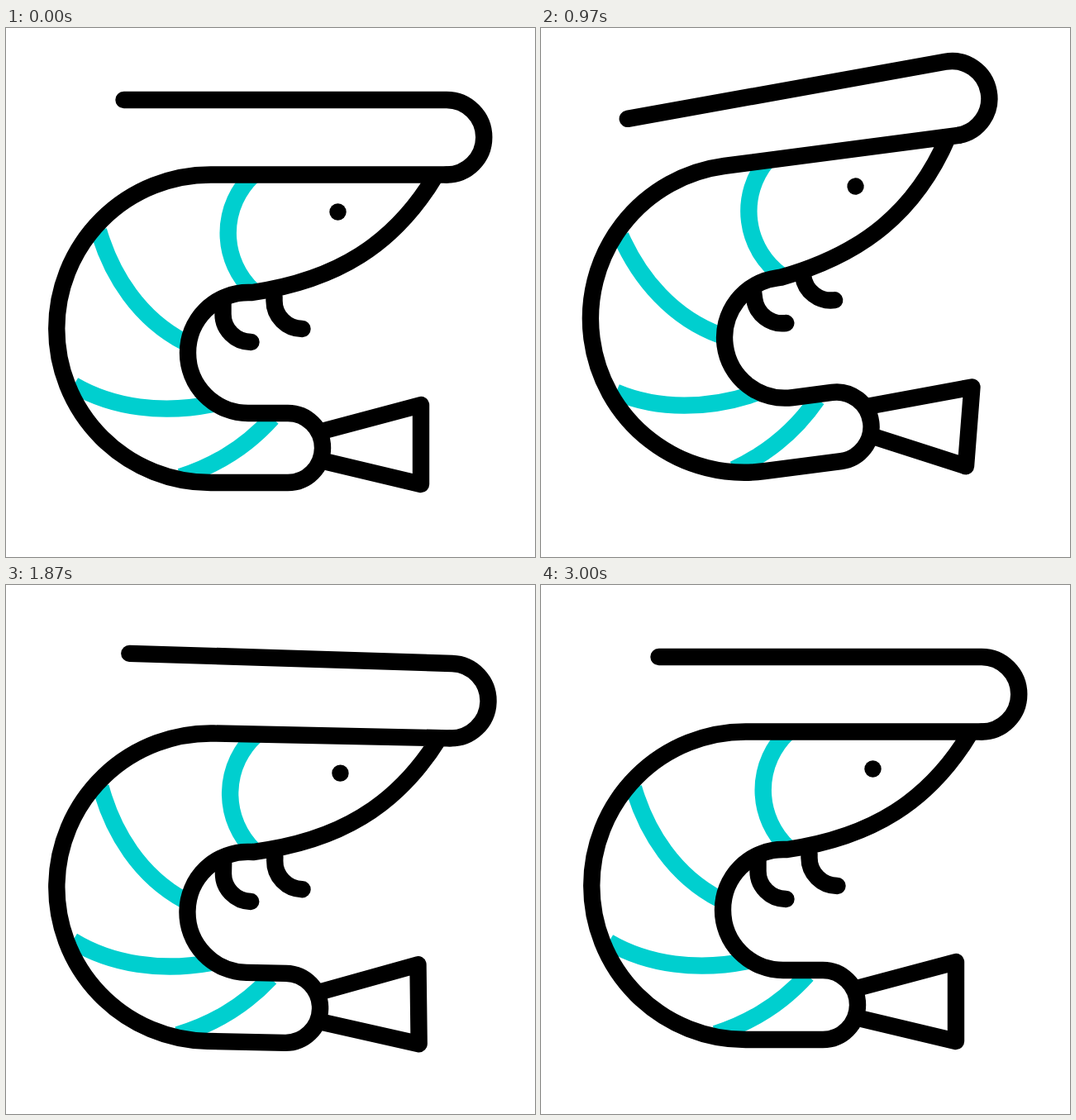
These frames come from a looping animation (640x640 px, 3.27 s). An HTML page:

```html
<!DOCTYPE html>
<html lang="en">
<head>
<meta charset="utf-8">
<title>Shrimp</title>
<style>
  html, body { margin: 0; height: 100%; overflow: hidden; background: #fff; }
  svg { display: block; width: 100%; height: 100%; }
</style>
</head>
<body>
<svg viewBox="0 0 640 640" fill="none" stroke="#000" stroke-width="20.4" stroke-linejoin="round">
  <g id="body">
    <g stroke="#00cfcf">
      <path d="M299 178A96 96 0 0 0 299 318"/>
      <path d="M112 245C128 300 162 352 216 380"/>
      <path d="M82 432C130 460 190 467 250 455"/>
      <path d="M211 543Q277 522 322 472"/>
    </g>
    <path id="tail" d="M378 489L502 456V552L378 522.500"/>
    <g stroke-linecap="round">
      <path id="leg1" d="M262.500 332V346A34 34 0 0 0 296.500 380"/>
      <path id="leg2" d="M324.500 325V330A34 34 0 0 0 358.500 364"/>
      <path id="antenna" d="M142.500 87H533a45 45 0 0 1 0 90.500"/>
      <path d="M533 177.500H247.500A186 186 0 0 0 247.500 550H341a42 42 0 0 0 0-84H293A73 73 0 0 1 293 320H298C400 305 470 262 520 178"/>
    </g>
    <ellipse id="eye" cx="401.500" cy="222.500" rx="10.200" ry="10.200" fill="#000" stroke="none"/>
  </g>
</svg>
<script>
const LOOP = 3270, LAST = 90, STEP = 10, LEG_CYCLE = 56;
const el = id => document.getElementById(id);
const smooth = u => u * u * (3 - 2 * u);

// Eased swings to alternating sides, one per STEP ticks. Each left-right pair
// has its own size; after `count` swings the part settles back to zero.
function swing(tick, count, size, settle = 1) {
  const angle = i => i < 1 || i > count ? 0 : (i % 2 ? 1 : -1) * size(Math.floor((i - 1) / 2));
  const pos = tick / STEP, i = Math.min(Math.floor(pos), count);
  const u = Math.min(1, (pos - i) / (i === count ? settle : 1));
  return angle(i) + (angle(i + 1) - angle(i)) * smooth(u);
}

const bodySize = pair => Math.max(2, 12 - 4 * pair);
const antennaSize = pair => 6 / (pair + 1);

// One down-and-up wave; a smaller `pace` makes the first half quicker.
const kick = (tick, pace) =>
  10.5 * Math.sin(2 * Math.PI * Math.min(1, tick / LEG_CYCLE) ** pace);

const move = (id, transform) => el(id).setAttribute("transform", transform);

function draw(now) {
  // 30 ticks per second, then a rest until the loop ends
  const tick = Math.min(LAST, Math.floor((now % LOOP + 4) * 0.03));
  move("body", `rotate(${-swing(tick, 7, bodySize)} 153 368)`);
  move("tail", `rotate(${1.6 * swing(tick, 8, bodySize)} 383 506)`);
  move("antenna", `rotate(${-swing(tick, 6, antennaSize, 2)} 533 177.5)`);
  move("leg1", `translate(0 ${kick(tick, 0.86)})`);
  move("leg2", `translate(0 ${kick(tick, 0.67)})`);
  el("eye").setAttribute("ry", 10.2 * Math.min(1, Math.abs(1 - tick / STEP)));
}

function loop() {
  draw(performance.now());
  requestAnimationFrame(loop);
}
loop();
</script>
</body>
</html>
```
